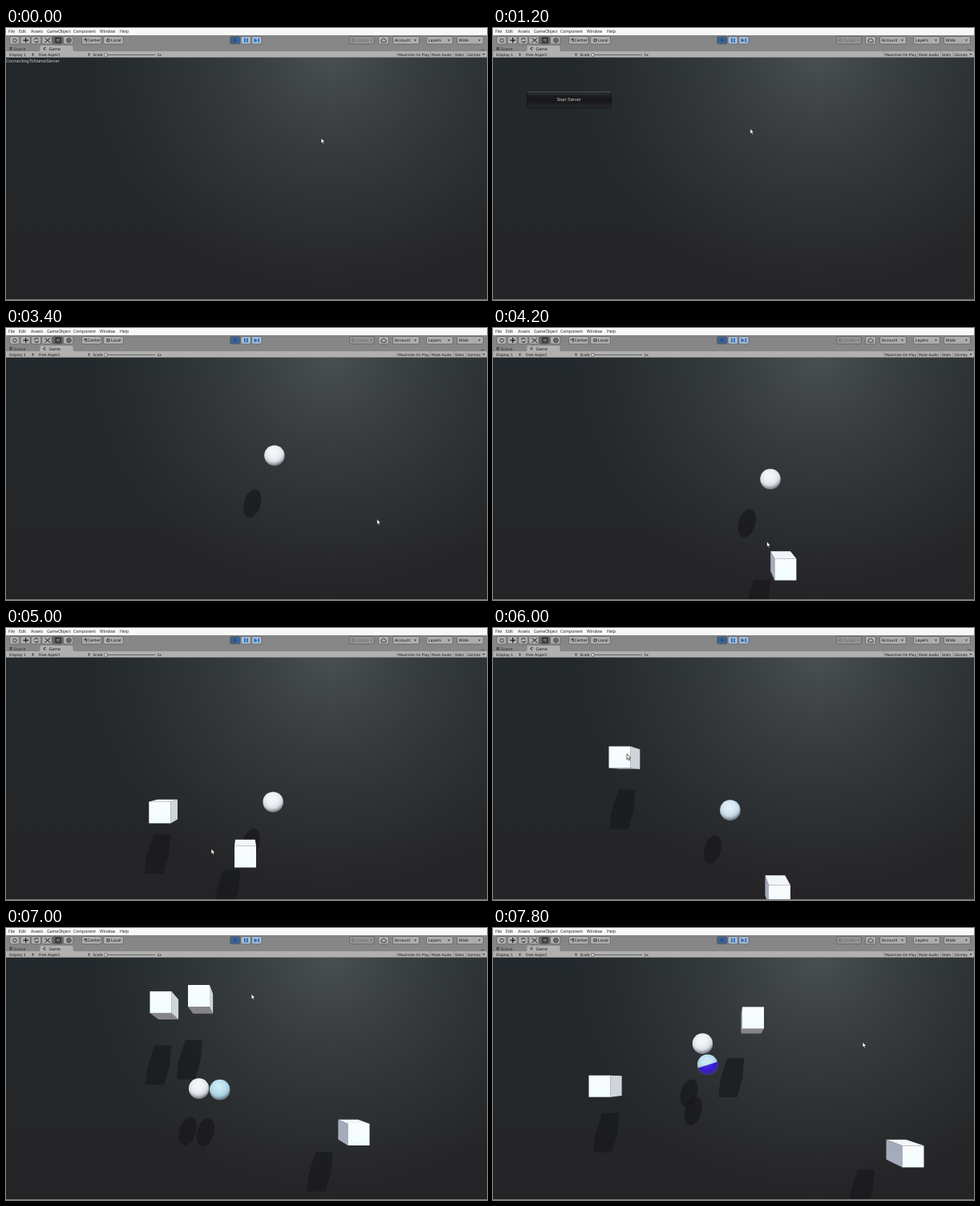
An HTML page with a canvas for the animation above (8 s loop, 600 by 339 pixels).

```html
<!DOCTYPE html>
<html lang="en">
<head>
<meta charset="utf-8">
<title>Game view</title>
<style>
html, body { margin: 0; height: 100%; overflow: hidden; background: #242425; }
canvas { display: block; width: 100vw; height: 100vh; }
</style>
</head>
<body>
<canvas width="600" height="339"></canvas>
<script>
const ctx = document.querySelector('canvas').getContext('2d');
const LOOP = 8000, STEP = 200;
const ARIAL = '"Liberation Sans", Arial, sans-serif';
const UI = '"DejaVu Sans", sans-serif';
const MENU = '"Open Sans", sans-serif';
const INK = '#161616';

// Waypoints of the pointer: time, x, y.
const waypoints = [[1000, 393, 137], [1800, 104, 90], [2600, 495, 167], [3200, 493, 231],
  [4200, 341.5, 266], [5000, 256, 275], [6000, 167, 157], [7000, 306, 82], [7800, 461, 142]];

// Bodies drift at constant speed (pixels per second); thrown ones also accelerate.
const drift = (from, to, x, y, vx, vy) => ({ from, to, x, y, vx, vy, ax: 0, ay: 0 });
const thrown = (x, y) => ({ from: 6000, to: LOOP, x, y, vx: 70, vy: -138, ax: 12.5, ay: 61.5 });

const cubes = [
  drift(4000, 5600, 381.5, 305, -83, -20),
  drift(4600, 6000, 205, 257.5, -33, -69),
  thrown(158, 161),
  thrown(357.5, 334),
  drift(6600, LOOP, 223, 40, -75, 131)
];
const whiteBall = drift(6400, LOOP, 225, 242, 26, -70);

const clamp = v => Math.max(0, Math.min(1, v));
const isLive = (b, t) => t >= b.from && t < b.to;

function place(b, t) {
  const s = (t - b.from) / 1000;
  return [b.x + b.vx * s + b.ax * s * s, b.y + b.vy * s + b.ay * s * s];
}

// The main ball swings on a circle.
function mainBall(t) {
  const a = (t - 4170) / 6400 * 2 * Math.PI;
  return [305 + 41 * Math.cos(a), 187 + 41 * Math.sin(a)];
}

function pointer(t) {
  const i = Math.max(1, waypoints.findIndex(w => w[0] >= t));
  const [t0, x0, y0] = waypoints[i - 1], [t1, x1, y1] = waypoints[i];
  const u = clamp((t - t0) / (t1 - t0));
  return [x0 + (x1 - x0) * u, y0 + (y1 - y0) * u];
}

function box(x, y, w, h, fill) {
  ctx.fillStyle = fill;
  ctx.fillRect(x, y, w, h);
}

function paint(fill, stroke, width = .7) {
  if (fill) {
    ctx.fillStyle = fill;
    ctx.fill();
  }
  if (stroke) {
    ctx.strokeStyle = stroke;
    ctx.lineWidth = width;
    ctx.stroke();
  }
}

function poly(points, fill, stroke) {
  ctx.beginPath();
  points.forEach(p => ctx.lineTo(...p));
  ctx.closePath();
  paint(fill, stroke);
}

function line(color, width, ...points) {
  ctx.beginPath();
  points.forEach(p => ctx.lineTo(...p));
  paint(null, color, width);
}

function ring(x, y, r, color, from = 0, to = 7) {
  ctx.beginPath();
  ctx.arc(x, y, r, from, to);
  paint(null, color, 1);
}

function round(x, y, w, h, fill, stroke) {
  ctx.beginPath();
  ctx.roundRect(x, y, w, h, 2);
  paint(fill, stroke);
}

function text(s, x, y, size, color, font = UI) {
  ctx.font = size + 'px ' + font;
  ctx.fillStyle = color;
  ctx.fillText(s, x, y);
}

function stops(g, ...colors) {
  colors.forEach((c, i) => g.addColorStop(i / (colors.length - 1), c));
  return g;
}

const vertical = (y0, y1, ...colors) => stops(ctx.createLinearGradient(0, y0, 0, y1), ...colors);

const button = (x, w, fill = '#adadad') => round(x + .5, 10.5, w - 1, 9.5, fill, '#5c5c5c');

const arrow = (x, y, up = 1, color = '#333') =>
  poly([[x, y], [x + 3, y], [x + 1.5, y + 2 * up]], color);

function backdrop() {
  box(0, 37, 600, 302, vertical(37, 339, '#23282c', '#25282a', '#252325'));
  const g = ctx.createRadialGradient(405, 30, 0, 405, 30, 310);
  box(0, 37, 600, 302, stops(g, 'rgba(82,87,88,.85)', 'rgba(70,75,77,.62)',
    'rgba(60,65,67,.36)', 'rgba(52,56,58,0)'));
}

function toolIcons() {
  for (let i = 0; i < 6; i++) button(4 + i * 13.4, 13.4, i === 4 ? '#666' : '#adadad');
  ring(11, 15.5, 2.2, '#444');
  line(INK, 1.2, [21.5, 15.3], [28, 15.3]);
  line(INK, 1.2, [24.7, 12], [24.7, 18.6]);
  ring(38, 15.3, 2.6, INK, .3, 2.6);
  ring(38, 15.3, 2.6, INK, 3.4, 5.8);
  line(INK, 1, [48.5, 12.5], [55, 18.2]);
  line(INK, 1, [55, 12.5], [48.5, 18.2]);
  ctx.strokeRect(62, 12.5, 6, 5.5);
  ring(78.5, 15.3, 2.7, INK);
  ring(78.5, 15.3, .8, INK);
}

function playButtons() {
  const glyph = '#2b68b4';
  for (let i = 0; i < 3; i++) button(279 + i * 13.5, 13.5, i ? '#a4bad2' : '#42628a');
  poly([[284, 12.7], [289, 15.4], [284, 18]], '#1f4f9a');
  box(297, 12.7, 1.7, 5.3, glyph);
  box(300, 12.7, 1.7, 5.3, glyph);
  poly([[309.5, 12.7], [314, 15.4], [309.5, 18]], glyph);
  box(314.5, 12.7, 1.5, 5.3, glyph);
}

function toolbar() {
  const dim = '#686868';
  box(0, 9, 600, 13, '#868686');
  toolIcons();
  button(94, 25.5);
  line(INK, 1, [97, 15.3], [100, 13], [100, 17.5]);
  text('Center', 101.5, 17, 4.9, INK);
  button(121, 26);
  ring(127.5, 15.3, 1.7, INK);
  text('Local', 131, 17, 4.9, INK);
  playButtons();

  button(428, 32, '#949494');
  ring(433, 15.3, 1.6, dim);
  text('Collab', 437, 17, 4.8, dim);
  arrow(454, 14.5, 1, dim);
  button(464, 14);
  ctx.beginPath();
  ctx.arc(469.3, 16.2, 1.6, 1.5, 4.7);
  ctx.arc(471, 14.8, 1.8, 3.7, 6);
  ctx.arc(473, 16.3, 1.5, 4.8, 7.9);
  ctx.closePath();
  paint(null, INK);
  [['Account', 482], ['Layers', 524], ['Wide', 562]].forEach(([s, x]) => {
    button(x, 34);
    text(s, x + 2.7, 17, 4.9, INK);
    arrow(x + 27, 14.5);
  });
}

function tabs() {
  box(0, 22, 600, 7, '#878787');
  poly([[42, 29], [43, 22], [83, 22], [84, 29]], '#b0b0b0');
  for (const d of [0, 1.7]) {
    line('#333', .6, [4, 24.8 + d], [8, 24.8 + d]);
    line('#333', .6, [5.2 + d, 23.5], [5.2 + d, 28]);
  }
  text('Scene', 9.5, 27.6, 4.9, '#333');
  ring(48.5, 25.8, 1.5, '#222', .7, 5.6);
  text('Game', 53.5, 27.6, 4.9, '#111');
  line('#444', .7, [592, 27.3], [597, 27.3]);
}

function viewOptions() {
  box(0, 29, 600, 8, '#b0b0b0');
  box(0, 36.3, 600, .7, '#777');
  [['Display 1', 4], ['Free Aspect', 41], ['Scale', 108.5], ['1x', 188.5]]
    .forEach(([s, x]) => text(s, x, 34.7, 4.5, INK));
  for (const x of [32, 102]) {
    arrow(x, 32.7, -.7);
    arrow(x, 33.5, .7);
  }
  line('#666', 1, [123, 33.5], [186, 33.5]);
  ctx.beginPath();
  ctx.arc(124.5, 33.4, 1.9, 0, 7);
  paint('#ddd', '#444');
  [['Maximize On Play', 489], ['Mute Audio', 531], ['Stats', 560], ['Gizmos', 575.5]]
    .forEach(([s, x]) => {
      box(x - 2, 29, .6, 7.5, '#858585');
      text(s, x, 34.7, 4.4, INK);
    });
  arrow(594.5, 32);
}

function chrome() {
  box(0, 0, 600, 9, '#f7f7f8');
  [['File', 3], ['Edit', 16], ['Assets', 31], ['GameObject', 51],
    ['Component', 84], ['Window', 117], ['Help', 142]]
    .forEach(([s, x]) => text(s, x, 6.2, 5.1, INK, MENU));
  toolbar();
  tabs();
  viewOptions();
  box(0, 338, 600, 1, '#7c7c7c');
}

function startButton() {
  round(42.5, 80, 105, 19.5, vertical(80, 100, '#343537', '#1c1c1e', '#161618', '#202022', '#2b2b2d'), '#101112');
  line('#5b5f62', .8, [43, 79.6], [147, 79.6]);
  text('Start Server', 79.5, 91.4, 5.7, '#d0d0d0', ARIAL);
}

// Shadows fall on the far wall, so their offset depends on the position.
const shadowAt = (x, y) => [x - 14 - (x - 241) * .145, y + 62 - (y - 144) * .155];

function ballShadow([x, y]) {
  ctx.beginPath();
  ctx.ellipse(...shadowAt(x, y), 10.3, 18, .28, 0, 7);
  paint('rgba(24,24,27,.72)');
}

// The back face is pulled towards the vanishing point.
const backOf = (x, y) => [x - (x - 297) * .093, y - (y - 190) * .093];

function cubeShadow([x, y]) {
  const [bx, by] = backOf(x, y);
  const [sx, sy] = shadowAt((x + bx) / 2, (y + by) / 2);
  const shape = [[-5, -25], [16, -25], [14, 0], [7, 24], [-16, 24], [-14, 3]];
  poly(shape.map(([a, b]) => [sx + a, sy + 5 + b]), 'rgba(24,25,28,.7)');
}

function cube([x, y]) {
  const corners = (cx, cy, r) => [[-1, -1], [1, -1], [1, 1], [-1, 1]]
    .map(([a, b]) => [cx + a * r, cy + b * r]);
  const f = corners(x, y, 13.5), b = corners(...backOf(x, y), 12.4);
  const side = (i, j, fill) => poly([f[i], f[j], b[j], b[i]], fill);
  if (b[0][1] < f[0][1]) side(0, 1, '#f0f6f8');
  if (b[2][1] > f[2][1]) side(2, 3, '#858587');
  if (b[0][0] < f[0][0]) side(3, 0, '#a4abbb');
  if (b[1][0] > f[1][0]) side(1, 2, '#cfd5da');
  poly(f, vertical(y - 14, y + 14, '#fbfbfd', '#f1fdfe'));
}

function ball([x, y], tint, blue) {
  ctx.save();
  ctx.beginPath();
  ctx.arc(x, y, 12.7, 0, 7);
  ctx.clip();
  const mix = (a, b) => a + (b - a) * tint;
  box(x - 13, y - 13, 26, 26, `rgb(${mix(238, 182)},${mix(240, 224)},${mix(245, 240)})`);
  if (blue > 0) {
    const h = 13 - 13 * blue;
    poly([[x - 14, y + 5 + h], [x + 14, y - 4 + h], [x + 14, y + 14], [x - 14, y + 14]], '#3210dc');
  }
  const g = ctx.createRadialGradient(x - 1, y - 4, 1, x - 1, y - 4, 17);
  box(x - 13, y - 13, 26, 26, stops(g, 'rgba(255,255,255,.35)', 'rgba(255,255,255,.1)',
    'rgba(80,86,104,.12)', 'rgba(50,52,64,.72)'));
  ctx.restore();
}

function cursor([x, y]) {
  const shape = [[0, 0], [0, 6.8], [1.5, 5.5], [2.6, 8], [3.7, 7.5], [2.7, 5.1], [4.7, 5]];
  poly(shape.map(([a, b]) => [x + a, y + b]), '#fff', '#222');
}

function draw(t) {
  backdrop();
  if (t < 600) {
    const states = ['ConnectingToNameServer', 'Authenticating', 'ConnectingToMasterserver'];
    text(states[t / STEP], 0, 43, 5.7, '#c9cbcc', ARIAL);
  } else if (t < 2800) startButton();

  const main = t >= 3000 && mainBall(t);
  const white = isLive(whiteBall, t) && place(whiteBall, t);
  const live = cubes.filter(b => isLive(b, t)).map(b => place(b, t));
  [main, white].filter(Boolean).forEach(ballShadow);
  live.forEach(cubeShadow);
  if (white) ball(white, 0, 0);
  if (main) ball(main, clamp((t - 5200) / 1600), clamp((t - 7000) / 800));
  live.forEach(cube);
  chrome();
  cursor(pointer(t));
}

function frame(now) {
  draw(Math.floor(now % LOOP / STEP) * STEP);
  requestAnimationFrame(frame);
}
requestAnimationFrame(frame);
</script>
</body>
</html>
```
